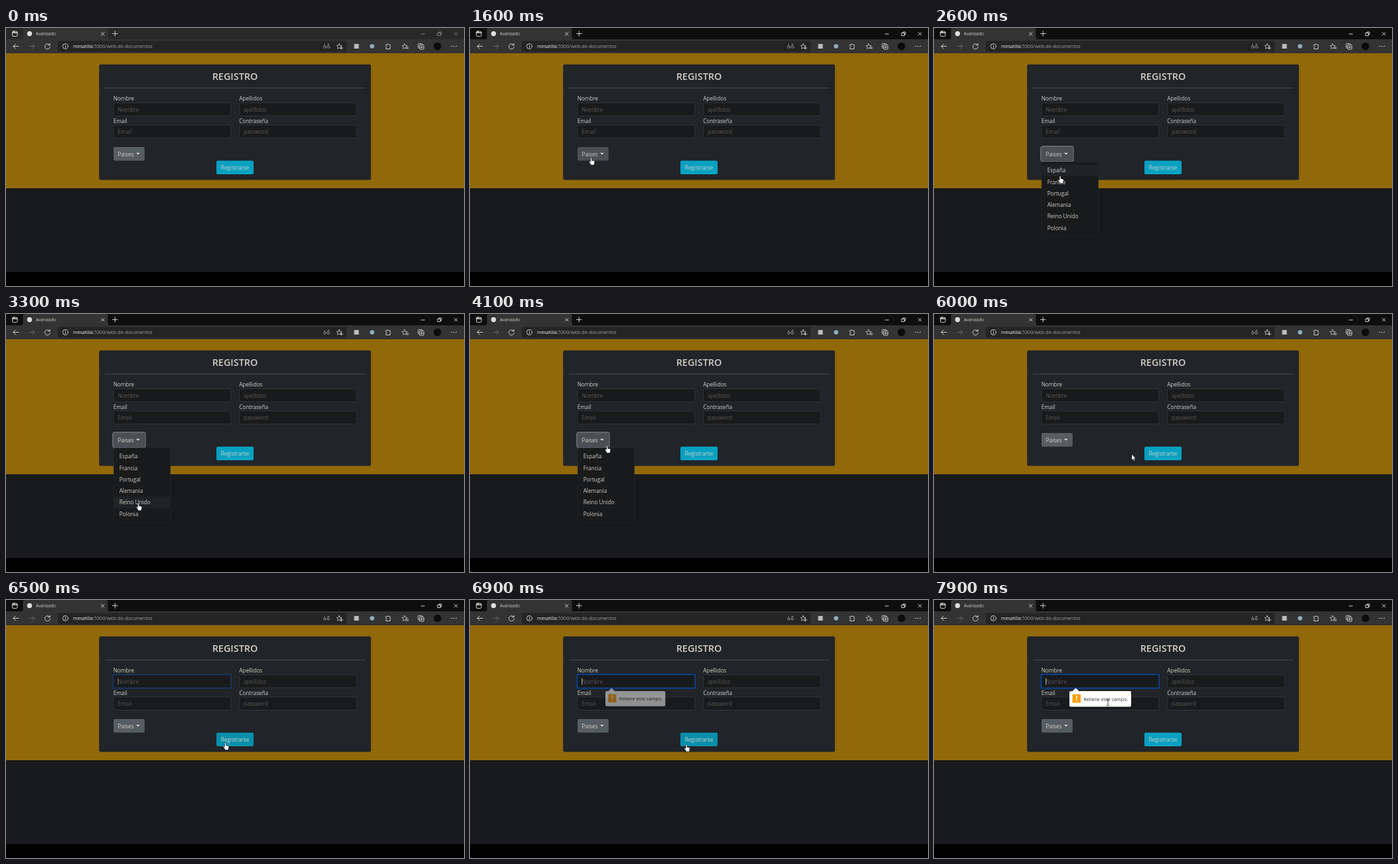
Animation of 690x388 px, one loop 8000 ms. Source, as an HTML page:

```html
<!DOCTYPE html>
<html lang="es">
<head>
<meta charset="utf-8">
<title>Registro</title>
<style>
  html, body { margin: 0; width: 100%; height: 100%; overflow: hidden; background: #000; }
  svg { display: block; width: 100vw; height: 100vh; }
  text { font-family: "Open Sans", "Noto Sans", sans-serif; font-size: 8.2px; fill: #d3cfc9; white-space: pre; }
  .line { fill: none; stroke: #dcdcdc; stroke-width: .9; stroke-linecap: round; stroke-linejoin: round; }
  .field { fill: #181a1c; stroke: #34383b; stroke-width: .8; }
  .hint { fill: #5c5954; }
</style>
</head>
<body>
<svg viewBox="0 0 690 388" preserveAspectRatio="none">
  <!-- Browser window -->
  <rect id="titleBar" width="690" height="18"/>
  <path d="M22 17.5Q25.500 17.500 25.500 14V3Q25.500 0 28.500 0H150Q153.500 0 153.500 3V14Q153.500 17.500 157 17.500Z" fill="#333"/>
  <rect y="17" width="690" height="21" fill="#333"/>
  <rect x="78" y="19.500" width="435" height="16.500" rx="3" fill="#242424"/>
  <g class="line">
    <rect x="9.500" y="5" width="7.500" height="7.500" rx="1.500"/>
    <path d="M9.500 7H17M12 5V7" stroke-width="1.400"/>
    <path d="M143.500 6.500l4.500 4.500m0-4.500l-4.500 4.500M160.500 8.500h7.500M164.250 4.750v7.500"/>
    <path d="M19 27.500H11M14.500 24L11 27.500L14.500 31"/>
    <path d="M35 27.500H43M39.500 24L43 27.500L39.500 31" stroke="#6b6b6b"/>
    <path d="M65.800 25.500A4 4 0 1 0 66.500 28.500M66.300 23.300V25.800H63.700"/>
    <circle cx="89.500" cy="27.500" r="4"/>
    <path d="M89.500 27.200V29.500M89.500 25.400V25.500"/>
    <g stroke="#a8a8a8" stroke-width=".8">
      <circle cx="480.300" cy="28.500" r="1.800"/><circle cx="485.600" cy="28.500" r="1.800"/>
      <path d="M479 26L480.500 24.500M485 26V24.500H487"/>
    </g>
    <path class="star" id="star" d="M0-4L1.200-1.300L4-1L1.900 .9L2.500 3.700L0 2.300L-2.500 3.700L-1.900 .9L-4-1L-1.200-1.300Z" transform="translate(502 27.500)" stroke="#bbb"/>
    <path d="M503.500 30H507.500M505.500 28V32" stroke="#bbb"/>
    <path d="M572.500 25H574.300Q575.300 22.500 576.300 25H578.500V27Q581 28 578.500 29V31.500H572.500V29.500Q575 28.300 572.500 27Z"/>
    <use href="#star" x="-1" transform="translate(99.500 0)"/>
    <path d="M603.500 29H606M604 31H606"/>
    <path d="M623 30H622Q621 30 621 29V24.500Q621 23.500 622 23.500H626.500Q627.500 23.500 627.500 24.500"/>
    <rect x="623" y="25.500" width="6.500" height="6.500" rx="1"/>
    <path d="M624.500 28.750H628M626.250 27V30.500"/>
    <path d="M671.500 27.500h.1M674.800 27.500h.1M678.100 27.500h.1" stroke-width="1.400"/>
  </g>
  <rect x="524.500" y="24" width="7" height="7" rx=".6" fill="#bdbdbd"/>
  <circle cx="551.500" cy="27.500" r="3.300" fill="#8fb0bd"/>
  <circle cx="650" cy="27.500" r="5.700" fill="#0b0b0b"/>
  <circle cx="35.500" cy="8.500" r="3.700" fill="#dedede"/>
  <path id="controls" class="line" d="M625.500 9H630.500M650.500 7.500H654.500V11.500H650.500ZM652 7.500V6H656V10H654.500M675.500 6.500l4.500 4.500m0-4.500l-4.500 4.500"/>
  <text x="45" y="11.200" style="font-size:6.600px">Avanzado</text>
  <text x="101" y="30.200" style="font-size:7.160px;fill:#a0a0a0"><tspan fill="#f2f2f2">mesatilla</tspan>:5300/web-de-documentos</text>

  <!-- Page -->
  <rect y="38" width="690" height="203.500" fill="#926908"/>
  <rect y="241" width="690" height="126" fill="#181a1d"/>
  <rect x="140.300" y="54.800" width="409.500" height="173.700" rx="2.500" fill="#212428"/>
  <path d="M149 90.200H541" stroke="#4b4e51"/>
  <text x="345" y="78.200" text-anchor="middle" style="font-size:14.400px;font-weight:600">REGISTRO</text>
  <g id="fields"></g>
  <g id="nameFocus">
    <rect x="161.300" y="111.700" width="178" height="21" rx="2" fill="none" stroke="#0c3f8c" stroke-width="2"/>
    <path id="caret" d="M168.800 117.500V127.500" stroke="#ddd" stroke-width=".8"/>
  </g>
  <rect id="countryRing" x="161" y="178" width="48.800" height="22.500" rx="3" fill="none" stroke="#5f666b" stroke-width="2"/>
  <rect id="country" x="162" y="179" width="46.800" height="20.500" rx="2"/>
  <text x="168.500" y="192.500">Paises</text>
  <path d="M196 187.700H201.600L198.800 190.600Z" fill="#e0ddd8"/>
  <rect id="submit" x="317" y="199.500" width="56" height="20.500" rx="2"/>
  <text x="345" y="213" text-anchor="middle" fill="#e8e6e3">Registrarse</text>
  <g id="menu">
    <rect x="162.300" y="201.500" width="85.200" height="112" rx="2" fill="#181a1c" stroke="#24282a" stroke-width=".7"/>
    <rect id="highlight" x="162.700" width="84.400" height="17.250" fill="#202326"/>
  </g>
  <g id="tip">
    <path d="M206 137H208.500L213.500 132.500L218.500 137H295Q297 137 297 139V158.500Q297 160.500 295 160.500H206Q204 160.500 204 158.500V139Q204 137 206 137Z" fill="#fff"/>
    <rect x="208.500" y="141.700" width="12.500" height="12.800" rx=".8" fill="#fba00c"/>
    <path d="M214.750 143.800V149.200M214.750 151V152.500" stroke="#fff" stroke-width="1.500"/>
    <text x="225.300" y="151.500" style="font-size:7.200px;fill:#333">Rellene este campo.</text>
  </g>

  <g id="pointer">
    <path id="arrow" d="M0 0V8.800L2 6.900L3.400 10L4.800 9.400L3.400 6.300H6Z" fill="#fff" stroke="#111" stroke-width=".5"/>
    <path id="hand" d="M-.9 .8Q0-.6 .9 .8V4.200L4 4.800Q5.400 5 5.200 6.600L4.500 9.800V11H-.6V10L-3 6.600Q-3.200 5.400-2 5.600L-.9 6.600Z" fill="#fff" stroke="#111" stroke-width=".5"/>
  </g>
  <path id="beam" d="M-2-4.800Q0-4.800 0-3.800V3.800Q0 4.800-2 4.800M2-4.800Q0-4.800 0-3.800M0 3.800Q0 4.800 2 4.800" fill="none" stroke="#ccc" stroke-width=".9" style="mix-blend-mode:difference"/>
</svg>
<script>
const DURATION = 8000, STEP = 100;
const el = id => document.getElementById(id);
const show = (id, on) => el(id).style.display = on ? '' : 'none';
const clamp = v => Math.min(1, Math.max(0, v));

function add(parent, tag, attrs, text = '') {
  const node = document.createElementNS(el('fields').namespaceURI, tag);
  for (const key in attrs) node.setAttribute(key, attrs[key]);
  node.textContent = text;
  el(parent).append(node);
}

const fields = [
  [162, 112.5, 'Nombre', 'Nombre'], [351.5, 112.5, 'Apellidos', 'apellidos'],
  [162, 146, 'Email', 'Email'], [351.5, 146, 'Contraseña', 'password']
];
for (const [x, y, label, hint] of fields) {
  add('fields', 'text', { x: x - .3, y: y - 3.4 }, label);
  add('fields', 'rect', { x, y, width: 176.5, height: 19.5, rx: 2, class: 'field' });
  add('fields', 'text', { x: x + 6.5, y: y + 13.2, class: 'hint' }, hint);
}

const ITEM_TOP = 205.5, ITEM_HEIGHT = 17.25;
const countries = ['España', 'Francia', 'Portugal', 'Alemania', 'Reino Unido', 'Polonia'];
countries.forEach((name, i) =>
  add('menu', 'text', { x: 170.7, y: 217.3 + i * ITEM_HEIGHT }, name));

// Pointer hotspot: time, x, y
const path = [
  [1300, 22, 139], [1400, 90, 155], [1500, 158, 184], [1600, 182.5, 195],
  [2300, 182.5, 195], [2600, 190, 222.4], [3000, 198, 270], [3100, 198, 270],
  [3500, 201, 299], [3700, 206, 265], [4000, 208, 209], [4100, 206.5, 198],
  [4400, 206.5, 198], [4800, 170, 176], [5200, 120.5, 148], [5400, 120.5, 148],
  [5500, 119.5, 145], [5700, 165, 166], [6000, 298, 211], [6300, 335, 212],
  [6700, 326, 217], [7100, 326, 217], [7600, 243, 151], [7800, 243, 151], [7900, 262, 154]
];

function pointerAt(t) {
  const next = path.findIndex(p => p[0] > t);
  if (next < 1) return path[next < 0 ? path.length - 1 : 0].slice(1);
  const [t0, x0, y0] = path[next - 1], [t1, x1, y1] = path[next];
  const k = (t - t0) / (t1 - t0);
  return [x0 + (x1 - x0) * k, y0 + (y1 - y0) * k];
}

function draw(t) {
  const [x, y] = pointerAt(t);
  const visible = t >= 1300, active = t >= 1100;
  const inside = (left, top, w, h) => visible && x >= left && x <= left + w && y >= top && y <= top + h;
  const menuOpen = t >= 2000 && t < 5600;
  const overCountry = inside(162, 179, 46.8, 20.5);
  const overSubmit = inside(317, 199.5, 56, 20.5);
  const overItem = menuOpen && inside(162, ITEM_TOP, 86, ITEM_HEIGHT * countries.length);
  const overField = !(menuOpen && y > 201) && fields.some(([fx, fy]) => inside(fx, fy, 176.5, 19.5));
  const overHand = overCountry || overSubmit || overItem;

  el('titleBar').setAttribute('fill', active ? '#0e0e0e' : '#282828');
  el('controls').style.stroke = active ? '#e0e0e0' : '#858585';
  el('country').setAttribute('fill', overCountry || menuOpen ? '#4a5054' : '#575e63');
  el('submit').setAttribute('fill', overSubmit ? '#078fac' : '#06a1c2');

  show('menu', menuOpen);
  show('countryRing', menuOpen);
  el('countryRing').style.opacity = clamp((t - 1900) / 200);
  show('highlight', overItem);
  el('highlight').setAttribute('y', ITEM_TOP + Math.floor((y - ITEM_TOP) / ITEM_HEIGHT) * ITEM_HEIGHT);

  const sinceFocus = t - 6500;
  show('nameFocus', sinceFocus >= 0);
  el('nameFocus').style.opacity = clamp((sinceFocus + 100) / 200);
  show('caret', sinceFocus % 1000 < 500);

  const tip = clamp((t - 6600) / 580);
  const scale = .94 + .06 * tip;
  el('tip').style.opacity = tip;
  el('tip').setAttribute('transform', `translate(204 137) scale(${scale}) translate(-204 -137)`);

  const place = `translate(${x} ${y})`;
  el('pointer').setAttribute('transform', place);
  el('beam').setAttribute('transform', place);
  show('arrow', visible && !overHand && !overField);
  show('hand', overHand);
  show('beam', overField);
}

function tick() {
  draw(Math.floor(performance.now() % DURATION / STEP) * STEP);
  requestAnimationFrame(tick);
}
tick();
</script>
</body>
</html>
```
